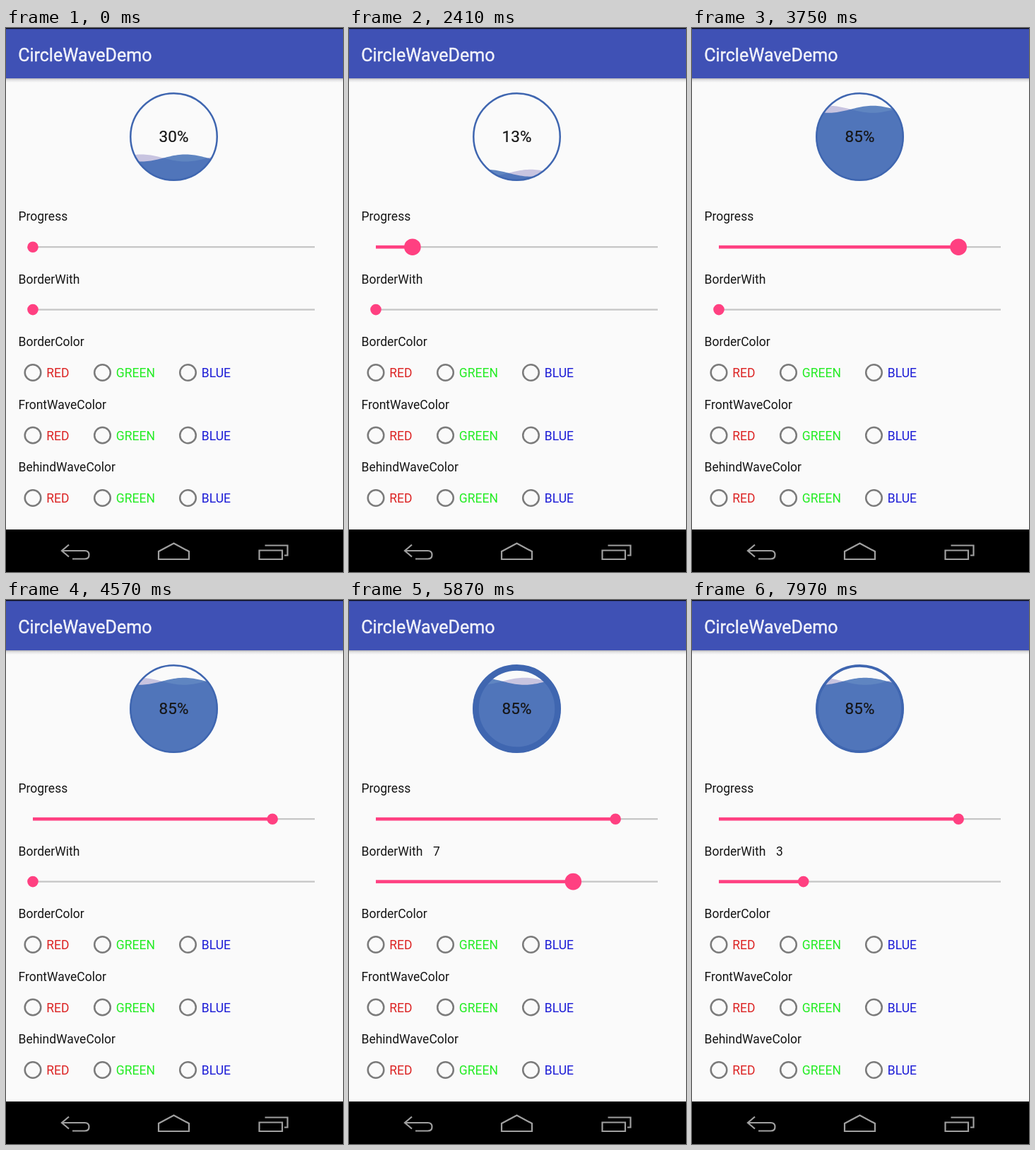
An HTML page for the animation above (8000 ms loop, 477 by 768 pixels).

```html
<!DOCTYPE html>
<html lang="en">
<head>
<meta charset="utf-8">
<title>CircleWaveDemo</title>
<style>
  html, body { margin: 0; width: 100%; height: 100%; overflow: hidden; background: #fafafa; }
  svg { display: block; }
  text { font: 17.5px Roboto, sans-serif; fill: #161616; white-space: pre; }
  #title { font-size: 25px; fill: #f1f2fa; stroke: #f1f2fa; stroke-width: .4; }
  #percent { font-size: 22.5px; text-anchor: middle; stroke: #161616; stroke-width: .2; }
  .nav { fill: none; stroke: #a0a0a0; stroke-width: 2.2; }
  .radio { fill: none; stroke: #7b7b7b; stroke-width: 2.5; }
</style>
</head>
<body>
<svg id="stage" width="477" height="768" viewBox="0 0 477 768">
  <defs>
    <linearGradient id="shade" x2="0" y2="1">
      <stop offset="0" stop-color="#b4b4b8"/>
      <stop offset=".4" stop-color="#e2e2e3"/>
      <stop offset="1" stop-color="#fafafa"/>
    </linearGradient>
    <clipPath id="disc"><circle cx="237.5" cy="153.5" r="62"/></clipPath>
  </defs>
  <rect width="477" height="768" fill="#fafafa"/>
  <rect y="71" width="477" height="6" fill="url(#shade)"/>
  <rect width="477" height="71" fill="#3f51b5"/>
  <rect width="477" height="1.3" fill="#0a0a14"/>
  <text id="title" x="17.2" y="46.5">CircleWaveDemo</text>

  <g clip-path="url(#disc)">
    <path id="behind" fill="#c8c4e0"/>
    <path id="front" fill="rgba(31,85,170,.7)"/>
  </g>
  <circle id="ring" cx="237.5" cy="153.5" fill="none" stroke="#3f66b0"/>
  <text id="percent" x="237.5" y="161"></text>

  <g id="form"></g>
  <text id="borderValue" x="119" y="360.5"></text>

  <rect y="708" width="477" height="60"/>
  <g class="nav">
    <path d="M89 729.500L79 738L89 746.500M79 738H111.500Q117.500 738 117.500 743.750T111.500 749.500H94"/>
    <path d="M216 750V739L237.500 727.500L259 739V750Z"/>
    <path d="M358.500 737.500H391V750H358.500ZM366.500 730.500H398.500V744.500H394"/>
  </g>
</svg>
<script>
const $ = id => document.getElementById(id);
const LOOP = 8000, STEP = 85.6;
const WAVE_LENGTH = 125, AMPLITUDE = 5, LEFT = 175, RIGHT = 300, TOP = 91;
const TRACK_LEFT = 38, TRACK_RIGHT = 437;

// Tables of [step, value].
const waveCycles = [[0, 0], [17, 1.392], [36, 3.264], [53, 5.016], [68, 6.544], [80, 7.784], [93, 9.072]];
const progressKeys = [[25, 1], [27, 7], [29, 18], [36, 60], [38, 70], [43, 85]];
const borderKeys = [[0, 0], [56, 1], [58, 2], [60, 3], [62, 4], [64, 5], [66, 6], [68, 7],
  [72, 8], [77, 7], [80, 6], [82, 5], [84, 4], [85, 3]];

function add(parent, tag, attrs, content = '') {
  const node = document.createElementNS('http://www.w3.org/2000/svg', tag);
  for (const key in attrs) node.setAttribute(key, attrs[key]);
  node.textContent = content;
  parent.append(node);
  return node;
}

function set(node, attrs) {
  for (const key in attrs) node.setAttribute(key, attrs[key]);
}

function lerpKeys(keys, step) {
  const next = keys.findIndex(key => key[0] > step);
  if (next < 0) return keys[keys.length - 1][1];
  if (next === 0) return keys[0][1];
  const [s0, v0] = keys[next - 1], [s1, v1] = keys[next];
  return v0 + (v1 - v0) * (step - s0) / (s1 - s0);
}

const holdKeys = (keys, step) => keys.filter(key => key[0] <= step).pop()[1];

// The thumb grows and shrinks within two steps.
function pressAmount(step, from, to) {
  return Math.max(0, Math.min(1, (step - from + 1) / 2, (to - step + 1) / 2));
}

const form = $('form');

function makeSlider(y) {
  add(form, 'rect', { x: TRACK_LEFT, y: y - 1.1, width: TRACK_RIGHT - TRACK_LEFT, height: 2.2, fill: '#c5c5c5' });
  const bar = add(form, 'rect', { x: TRACK_LEFT, y: y - 2.3, height: 4.6, fill: '#ff4081' });
  const thumb = add(form, 'circle', { cy: y, fill: '#ff4081' });
  return (ratio, press) => {
    const width = ratio * (TRACK_RIGHT - TRACK_LEFT);
    set(bar, { width });
    set(thumb, { cx: TRACK_LEFT + width, r: 7.8 + 4 * press });
  };
}

['Progress', 'BorderWith', 'BorderColor', 'FrontWaveColor', 'BehindWaveColor'].forEach((label, row) => {
  const y = 272 + row * 88.5;
  add(form, 'text', { x: 17.5, y }, label);
  if (row < 2) return;
  [['RED', 38, '#dc2424'], ['GREEN', 136.5, '#24ec24'], ['BLUE', 257.5, '#1c1cd6']].forEach(([name, x, color]) => {
    add(form, 'circle', { class: 'radio', cx: x, cy: y + 37.5, r: 11.3 });
    add(form, 'text', { x: x + 19.3, y: y + 44.3, style: `fill:${color}` }, name);
  });
});

const progressSlider = makeSlider(309.2);
const borderSlider = makeSlider(397.6);

function wavePath(level, peak) {
  let d = `M${LEFT} 220`;
  for (let x = LEFT; x <= RIGHT; x += 2.5) {
    const y = level - AMPLITUDE * Math.cos((x - peak) / WAVE_LENGTH * 2 * Math.PI);
    d += `L${x} ${y.toFixed(2)}`;
  }
  return d + `L${RIGHT} 220Z`;
}

function draw(time) {
  const step = Math.floor(time / STEP);
  const touched = step >= progressKeys[0][0];
  const progress = touched ? Math.round(lerpKeys(progressKeys, step)) : 0;
  const percent = touched ? progress : 30;
  const border = holdKeys(borderKeys, step);
  const ringWidth = 1.25 * (border || 2);

  const level = TOP + WAVE_LENGTH * (1 - percent / 100) + AMPLITUDE;
  const peak = 254 - WAVE_LENGTH * lerpKeys(waveCycles, step);
  set($('front'), { d: wavePath(level, peak) });
  set($('behind'), { d: wavePath(level, peak + WAVE_LENGTH / 2) });
  set($('ring'), { r: 62.5 - ringWidth / 2, 'stroke-width': ringWidth });

  $('percent').textContent = percent + '%';
  $('borderValue').textContent = border || '';
  progressSlider(progress / 100, pressAmount(step, 25, 46));
  borderSlider(border / 10, pressAmount(step, 55, 86));
}

const start = performance.now();
function tick() {
  draw((performance.now() - start) % LOOP);
  requestAnimationFrame(tick);
}
tick();
</script>
</body>
</html>
```
